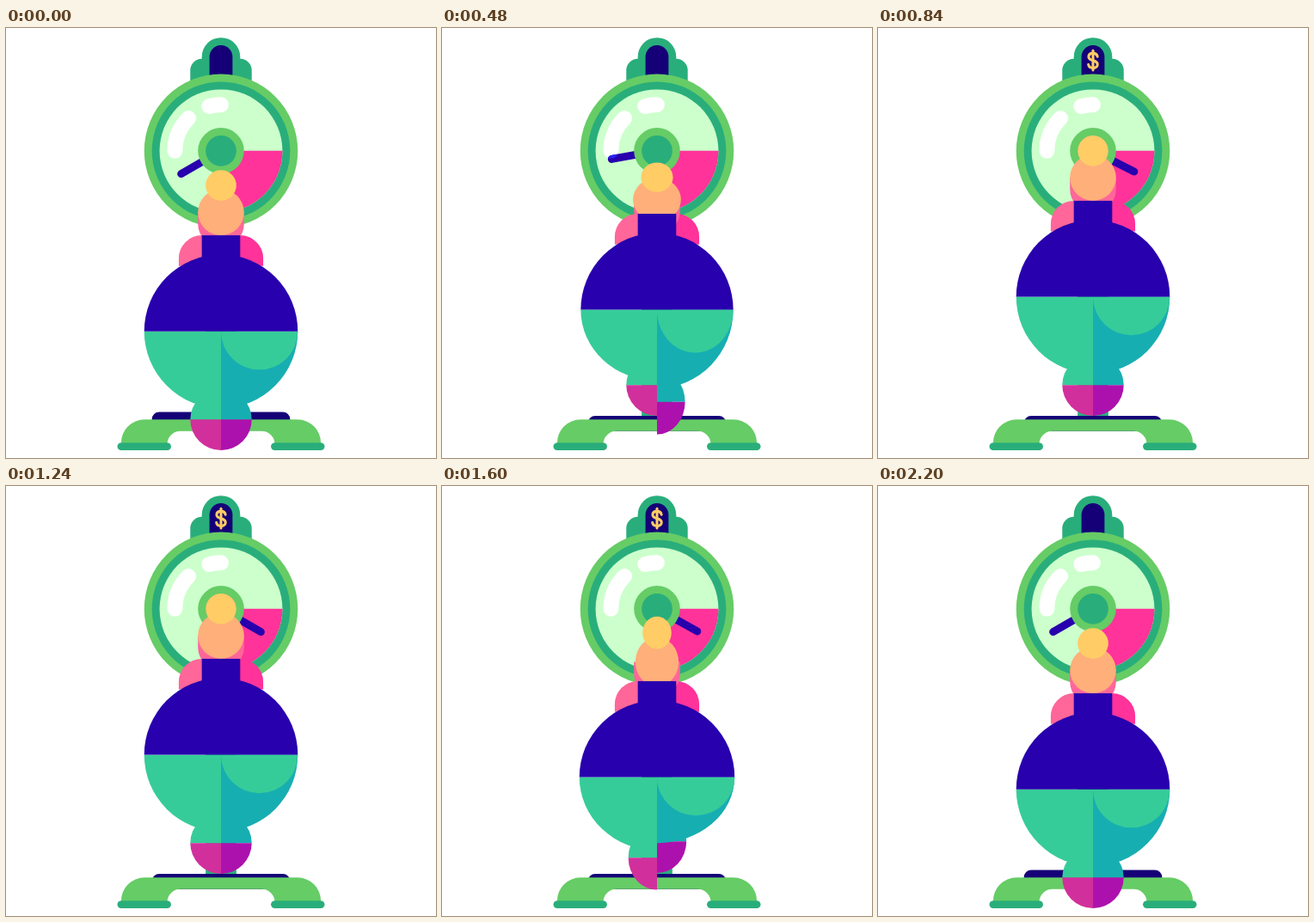
Write an HTML page that moves like this. It is 500x500 px and loops after 2.4 s.

```html
<!DOCTYPE html>
<html lang="en">
<head>
<meta charset="utf-8">
<title>Weighing in</title>
<style>
  html, body { margin: 0; width: 100%; height: 100%; overflow: hidden; background: #fff; }
  svg { display: block; width: 100%; height: 100%; }
  .lime { fill: #66cc66; }
  .green { fill: #29ae7b; }
  .ink { fill: #150077; }
  .navy { fill: #2800ad; }
  .rose { fill: #ff6699; }
  .pink { fill: #ff3399; }
  .mint { fill: #36cc99; }
  .teal { fill: #17aeb2; }
  .line { fill: none; stroke-linecap: round; }
</style>
</head>
<body>
<!-- Drawn on a grid of 56 units, centred on x = 0 -->
<svg viewBox="-28 0 56 56">
  <defs>
    <g id="shine" class="line" stroke="#fff" stroke-width="2">
      <path d="M-6 16A6 6 0 0 1 -4.24 11.76"/>
      <path d="M-1.55 10.2A6 6 0 0 1 0 10"/>
    </g>
    <mask id="shineMask" maskUnits="userSpaceOnUse" x="-28" y="0" width="56" height="56">
      <use href="#shine"/>
    </mask>
  </defs>

  <!-- Scale -->
  <rect class="green" x="-2" y="22" width="4" height="29"/>
  <rect class="green" x="-4" y="4" width="8" height="6" rx="1.5"/>
  <rect class="green" x="-2.5" y="1.25" width="5" height="9" rx="2.5"/>
  <rect class="ink" x="-1.5" y="2.25" width="3" height="7" rx="1.5"/>
  <g id="dollar" class="line" stroke="#ffcc66" stroke-width=".34">
    <path d="M.58 3.72C.52 3.43 .29 3.29 0 3.29C-.34 3.29 -.57 3.47 -.57 3.75C-.57 4.37 .59 4.1 .59 4.73C.59 5.02 .34 5.21 0 5.21C-.31 5.21 -.55 5.06 -.6 4.77"/>
    <path d="M0 2.95V5.49"/>
  </g>
  <circle class="lime" cy="16" r="10"/>
  <circle class="green" cy="16" r="9"/>
  <circle cy="16" r="8" fill="#ccffcc"/>
  <path class="pink" d="M0 16H8A8 8 0 0 1 0 24Z"/>
  <use href="#shine"/>
  <path class="line needle" d="M0 16H6" stroke="#2800ad"/>
  <g mask="url(#shineMask)">
    <path class="line needle" d="M0 16H6" stroke="#2424f2"/>
  </g>
  <circle class="lime" cy="16" r="3"/>
  <circle class="green" cy="16" r="2"/>

  <path id="plate" class="ink" d="M-9 51V50.950A.950 .950 0 0 1 -8.050 50H8.050A.950 .950 0 0 1 9 50.950V52H-9Z"/>
  <path class="lime" d="M-13 54.200V54A3 3 0 0 1 -10 51H10A3 3 0 0 1 13 54V54.200H7A1.700 1.700 0 0 0 5.300 52.500H-5.300A1.700 1.700 0 0 0 -7 54.200Z"/>
  <rect class="green" x="-13.5" y="54" width="7" height="1" rx=".5"/>
  <rect class="green" x="6.5" y="54" width="7" height="1" rx=".5"/>

  <!-- Person -->
  <path id="legL" class="mint"/>
  <path id="shoeL" fill="#d1309c"/>
  <path id="legR" class="teal"/>
  <path id="shoeR" fill="#ad11ad"/>
  <g id="shoulders">
    <path class="rose" d="M0 0H-2.500A3 3 0 0 0 -5.500 3V4H0Z"/>
    <path class="pink" d="M0 0H2.500A3 3 0 0 1 5.500 3V4H0Z"/>
  </g>
  <path id="neck" class="rose" d="M-3 0V1.500A3 3 0 0 0 3 1.500V0Z"/>
  <ellipse id="head" fill="#ffaf7a"/>
  <ellipse id="bun" fill="#ffcc66"/>
  <rect id="collar" class="navy" x="-2.5" width="5" height="6"/>
  <path id="hipL" class="mint"/>
  <path id="hipR" class="teal"/>
  <path id="seat" class="mint"/>
  <path id="back" class="navy"/>
</svg>
<script>
const LOOP = 2400, STEP = 40;
const LAG = 280;     // right foot behind left foot
const RISE = 4.5;    // height of the plate above the floor

const set = (id, attrs) => {
  const el = document.getElementById(id);
  for (const k in attrs) el.setAttribute(k, attrs[k]);
};
const part = (t, start, length) => Math.min(1, Math.max(0, (t - start) / length));
const ease = (...span) => {
  const x = part(...span);
  return x * x * (3 - 2 * x);
};
const pulse = (...span) => Math.sin(Math.PI * part(...span));

// Fast start, long soft stop
const swing = t => 1 - Math.exp(-((Math.max(0, t) / 233) ** 2.3));

const hop = t => pulse(t, 40, 360) + pulse(t, 1240, 500);
const duck = t => pulse(t, 360, 240) + pulse(t, 1240, 240);
const settle = t => pulse(t, 600, 240) + pulse(t, 1760, 280);

// dir is -1 for the left side, 1 for the right
const quarter = (dir, y, rx, ry) =>
  `M${dir * rx} ${y}A${rx} ${Math.abs(ry)} 0 0 ${dir * ry > 0 ? 1 : 0} 0 ${y + ry}V${y}Z`;

function drawSide(side, dir, t, hip, girth) {
  const lift = hop(t);
  const ankle = 51 - RISE * (ease(t, 40, 360) - ease(t, 1460, 280)) - .45 * lift;
  const rx = 4 - .35 * lift, ry = 4 + .25 * lift;
  set("leg" + side, { d: quarter(dir, ankle, rx, -ry) });
  set("shoe" + side, { d: quarter(dir, ankle, rx, ry) });
  set("hip" + side, { d: quarter(dir, hip, girth, 10 + .45 * (ankle - hip - 11.5)) });
}

function drawScale(t) {
  const angle = 150 + 240 * (swing(t - 400) - swing(t - 1580));
  for (const n of document.querySelectorAll(".needle")) {
    n.setAttribute("transform", `rotate(${angle} 0 16)`);
  }
  set("dollar", { opacity: ease(t, 620, 120) - ease(t, 1700, 140) });
  const press = .5 * (ease(t, 340, 100) - ease(t, 1640, 120));
  set("plate", { transform: `translate(0 ${press})` });
}

function drawPerson(t) {
  const low = duck(t), tall = duck(t - 240);
  const squash = low - 1.5 * tall;
  const hip = 39.5 - RISE * (ease(t, 200, 480) - ease(t, 1240, 600)) - .22 * settle(t);
  const girth = 10 - .07 * squash;
  drawSide("L", -1, t, hip, girth);
  drawSide("R", 1, t - LAG, hip, girth);
  set("seat", { d: `M0 ${hip}A${girth / 2} ${5 + .6 * low - .4 * settle(t)} 0 0 0 ${girth} ${hip}Z` });
  set("back", { d: `M${-girth} ${hip}A${girth} 10 0 0 1 ${girth} ${hip}Z` });

  const top = hip - 12.5;
  const headY = top - 3 + 1.15 * low + .5 * tall;
  set("shoulders", { transform: `translate(0 ${top})` });
  set("collar", { y: top });
  set("neck", { transform: `translate(0 ${headY})` });
  set("head", { cy: headY, rx: 3 + .12 * squash, ry: 3 - .14 * squash });
  set("bun", { cy: top - 6.5 + 1.75 * low + .2 * tall, rx: 2 + .08 * squash, ry: 2 - .08 * squash });
}

function frame() {
  const t = Math.floor(performance.now() % LOOP / STEP) * STEP;
  drawScale(t);
  drawPerson(t);
  requestAnimationFrame(frame);
}
frame();
</script>
</body>
</html>
```
